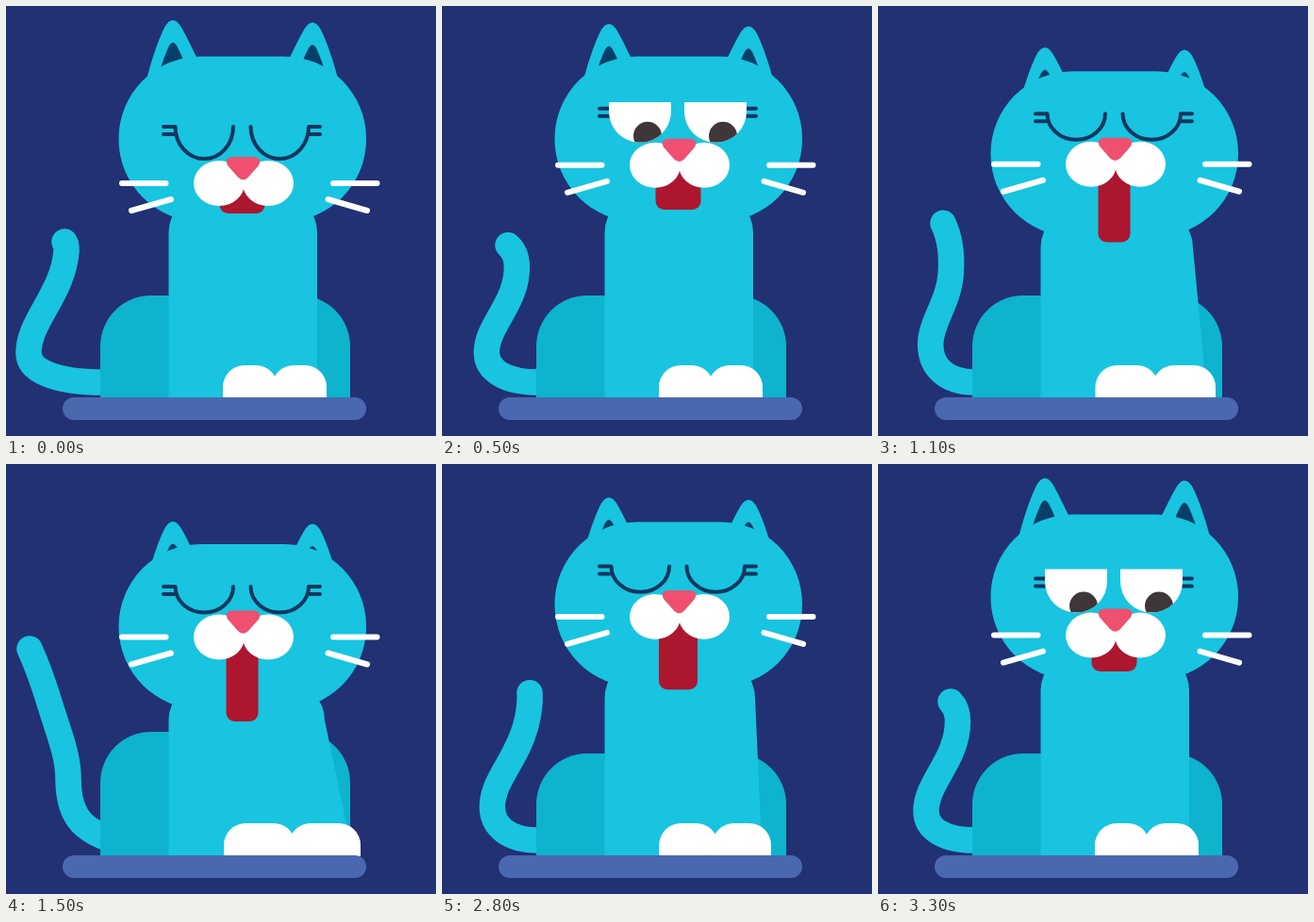
Write an HTML page that moves like this. It is 456 by 456 pixels and loops after 3.4 s.

```html
<!DOCTYPE html>
<html lang="en">
<head>
<meta charset="utf-8">
<title>Yawning cat</title>
<style>
html, body { margin: 0; width: 100%; height: 100%; overflow: hidden; background: #223173; }
svg { display: block; width: 100%; height: 100%; }
.fur { fill: #18c4df; }
.line { fill: none; stroke: #10365f; stroke-width: 4; stroke-linecap: round; }
</style>
</head>
<body>
<svg viewBox="0 0 456 456">
  <defs>
    <clipPath id="lid"><path id="lidShape"/></clipPath>
    <g id="ear">
      <path class="fur" d="M148 82C153 62 161 36 169 21Q177 9 185 21C191 31 198 46 205 60V90H148Z"/>
      <path fill="#06406a" d="M162 72Q167 55 173 42Q177 35 181 42Q188 55 193 72Z"/>
    </g>
  </defs>
  <rect width="456" height="456" fill="#223173"/>
  <path id="tail" fill="none" stroke="#18c4df" stroke-width="27.5" stroke-linecap="round"/>
  <path id="haunch" fill="#0eb3ce"/>
  <path id="body" class="fur"/>
  <g id="ears">
    <use href="#ear"/>
    <use href="#ear" transform="translate(502 2.5) scale(-1 1)"/>
  </g>
  <rect id="head" class="fur" x="119.5" y="53.5" width="262.5" height="175" rx="87"/>
  <path id="paws" fill="#fff"/>
  <rect id="mouth" fill="#ac172f" rx="9"/>
  <g id="face">
    <path id="lashes" class="line"/>
    <g id="eye">
      <g id="open">
        <path id="white" fill="#fff"/>
        <circle cx="218" cy="157" r="15" fill="#3f3638" clip-path="url(#lid)"/>
      </g>
      <path id="shut" class="line"/>
    </g>
    <use href="#eye" x="80"/>
    <path fill="none" stroke="#fff" stroke-width="6" stroke-linecap="round"
      d="M123 188H169.500M133 217L175 205M347 188H393.500M341.500 205L383 217"/>
    <ellipse cx="226" cy="188" rx="27" ry="24" fill="#fff"/>
    <ellipse cx="278" cy="188" rx="27" ry="24" fill="#fff"/>
    <path fill="#ef5070" d="M240 160H263Q272 161 268 169L257 181.500Q251.500 187 246 181.500L235 169Q231 161 240 160Z"/>
  </g>
  <rect x="60" y="415" width="322" height="24" rx="12" fill="#4a68af"/>
</svg>
<script>
const LOOP = 3400;
const PEAK = 12; // step at which the yawn is widest
const DEPTH = 9; // steps from rest to the peak

// Tail poses by yawn step: x, y of the low bend, the upper bend and the tip
const SWING = [24, 368, 64, 260, 62, 250];
const TAIL = [
  [0, [40, 366, 69, 280, 56, 257]],
  [3, [51, 368, 84.5, 273, 77, 252]],
  [5, [51, 368, 100, 273, 117, 255]],
  [8, [58, 354, 66, 288, 45, 218]],
  [9, [66, 333, 47, 256, 25, 196]]
];

const $ = id => document.getElementById(id);
const set = (id, attrs) => {
  for (const name in attrs) $(id).setAttribute(name, attrs[name]);
};
const shift = (id, y) => set(id, { transform: `translate(0 ${y})` });
const ramp = (x, a, b) => Math.min(1, Math.max(0, (x - a) / (b - a)));
const mix = (a, b, k) => a.map((v, i) => v + (b[i] - v) * k);

// The picture moves in steps that linger around the peak
const hold = i => i === PEAK ? 1000 : Math.abs(i - 11) < 3 ? 200 : 100;
function stepAt(t) {
  let i = 0;
  for (let end = hold(0); end <= t; end += hold(i)) i++;
  return i;
}

function tailPose(i, q) {
  if (i < 3) return mix(SWING, TAIL[0][1], i / 3);
  if (i > PEAK) q = Math.max(q, 3);
  const n = Math.max(1, TAIL.findIndex(key => key[0] >= q));
  const [a, from] = TAIL[n - 1], [b, to] = TAIL[n];
  return mix(from, to, ramp(q, a, b));
}

function tailPath([lx, ly, bx, by, tx, ty], lift) {
  const base = 399 - 4 * lift;
  const h1 = Math.hypot(bx - lx, by - ly), h2 = Math.hypot(tx - bx, ty - by);
  // Direction through the upper bend halves the angle between its neighbours
  let dx = (bx - lx) / h1 + (tx - bx) / h2, dy = (by - ly) / h1 + (ty - by) / h2;
  const len = Math.hypot(dx, dy);
  dx /= len;
  dy /= len;
  return `M103 ${base}C${lx + (103 - lx) * 0.35} ${base - 10 * lift} ${lx} ${ly + (base - ly) * 0.6} ${lx} ${ly}`
    + `C${lx} ${ly - h1 * 0.3} ${bx - dx * h1 * 0.4} ${by - dy * h1 * 0.4} ${bx} ${by}`
    + `Q${bx + dx * h2 * 0.6} ${by + dy * h2 * 0.6} ${tx} ${ty}`;
}

const paw = (x, w) => `M${x} 416V404A23 23 0 0 1 ${x + 23} 381H${x + w - 23}A23 23 0 0 1 ${x + w} 404V416Z`;

function draw(t) {
  const i = stepAt(t);
  const q = Math.max(0, DEPTH - Math.abs(i - PEAK));
  const asleep = 1 - ramp(i, 0, 2);
  const sink = ramp(q, 5, 9), lift = ramp(q, 7, 9);
  const head = 31.5 * sink, lean = 36 * sink;
  const face = head - 32 * ramp(q, 0.5, 3) - 4 * ramp(q, 5, 7);

  set('tail', { d: tailPath(tailPose(i, q), lift) });
  const back = 361 - 23 * lift;
  set('haunch', { d: `M100 416V${back}a54 54 0 0 1 54 -54H311a54 54 0 0 1 54 54V416Z` });

  const side = 330 + lean * 0.22;
  set('body', {
    d: `M172.500 416V${240 + head}a40 40 0 0 1 40 -40H${side - 40}a40 40 0 0 1 40 40L${330 + lean * 1.06} 416Z`
  });
  const w = 58 + lean / 2;
  set('paws', { d: paw(230 + sink, w) + paw(340 + lean - w, w) });

  shift('head', head);
  shift('ears', 12 * ramp(q, 1, 4) + 34 * sink);
  shift('face', face);
  const gape = 48 - 14 * ramp(q, 5, 7);
  const jaw = 220 - 8 * ramp(q, 1, 3) + 16 * ramp(q, 3, 5) + 45 * sink;
  set('mouth', { x: 250.5 - gape / 2, y: 188 + face, width: gape, height: jaw - 188 - face });

  const lid = 118 + 13 * Math.max(asleep, ramp(q, 1, 5));
  const bend = 34 * Math.max(asleep, ramp(q, 4, 6));
  const lash = 128 + 6.5 * ramp(q, 2.8, 5);
  const closed = bend > 30;
  const white = `M177 ${lid}Q210 ${lid + bend * 2} 243 ${lid}V131A33 33 0 0 1 177 131Z`;
  set('white', { d: white });
  set('lidShape', { d: white });
  set('open', { display: closed ? 'none' : 'inline' });
  set('shut', {
    display: closed ? 'inline' : 'none',
    d: `M179.500 ${lash}A30.750 ${162 - lash} 0 0 0 241 ${lash}`
  });
  set('lashes', { d: [167, 322].map(x => `M${x} ${lash}h11m-11 8h11`).join('') });
}

const start = performance.now();
function tick() {
  draw((performance.now() - start) % LOOP);
  requestAnimationFrame(tick);
}
tick();
</script>
</body>
</html>
```
